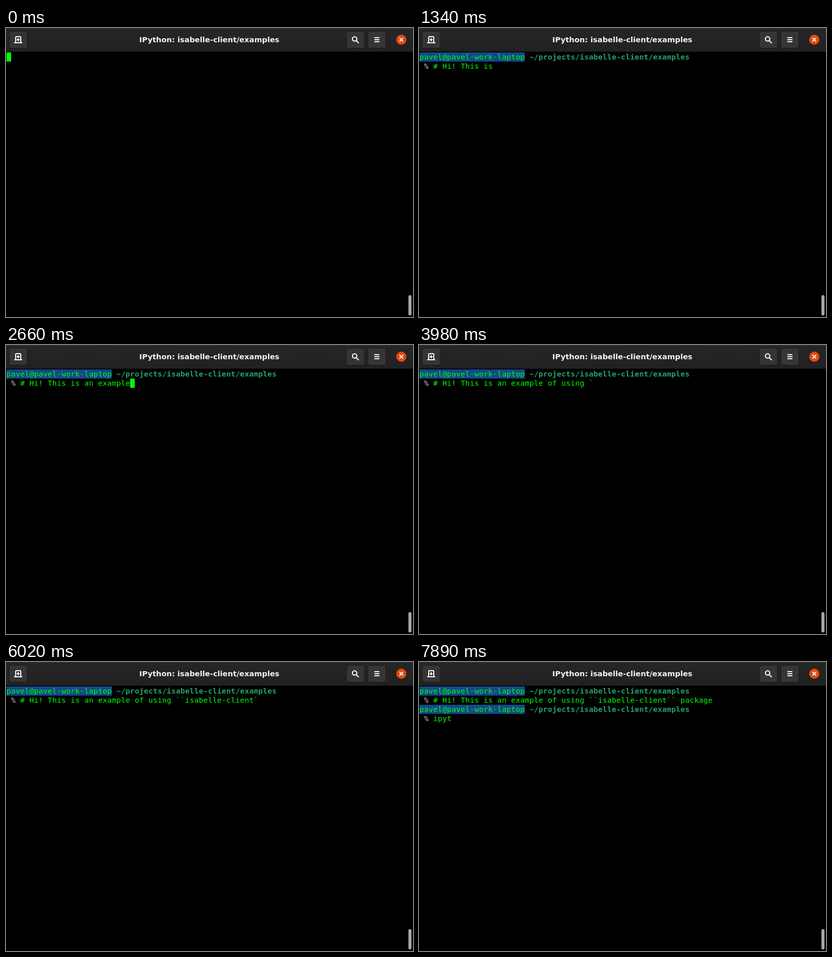
An HTML page with a canvas for the animation above (8 s loop, 800x568 px).

```html
<!DOCTYPE html>
<html lang="en">
<head>
<meta charset="utf-8">
<title>Terminal</title>
<style>
  html, body { margin: 0; width: 100%; height: 100%; overflow: hidden; background: #000; }
  canvas { display: block; width: 800px; height: 568px; }
</style>
</head>
<body>
<canvas id="stage" width="800" height="568"></canvas>
<script>
const ctx = document.getElementById("stage").getContext("2d");
const LOOP = 8000, KEY = 120, ENTER = 7320;
const CELL_W = 9, CELL_H = 18, LEFT = 1, TOP = 48, ASCENT = 14;
const MONO = '14.667px "DejaVu Sans Mono", monospace';
const LIME = "#00ff00";
const USER = "pavel@pavel-work-laptop";
const FOLDER = "~/projects/isabelle-client/examples";
const COMMENT = "# Hi! This is an example of using ``isabelle-client`` package";
const COMMAND = "ipython";

const cellX = col => LEFT + col * CELL_W;
const cellY = row => TOP + row * CELL_H;

function rect(x, y, w, h, color) {
  ctx.fillStyle = color;
  ctx.fillRect(x, y, w, h);
}

function rounded(x, y, w, h, r, color) {
  ctx.fillStyle = color;
  ctx.beginPath();
  ctx.roundRect(x, y, w, h, r);
  ctx.fill();
}

function stroke(path, width, color = "#fff") {
  ctx.strokeStyle = color;
  ctx.lineWidth = width;
  ctx.stroke(new Path2D(path));
}

// Terminal text sits on a fixed character grid.
function print(text, col, row, color, bold = false) {
  ctx.font = (bold ? "bold " : "") + MONO;
  ctx.textAlign = "left";
  ctx.fillStyle = color;
  [...text].forEach((ch, i) => ctx.fillText(ch, cellX(col + i), cellY(row) + ASCENT));
}

function cursor(col, row) {
  rect(cellX(col), cellY(row), CELL_W, CELL_H, LIME);
}

function prompt(row, typed) {
  rect(LEFT, cellY(row), USER.length * CELL_W, CELL_H, "#12488b");
  print(USER, 0, row, LIME);
  print(FOLDER, USER.length + 1, row, "#26a269", true);
  print("%", 1, row + 1, "#d0cfcc");
  print(typed, 3, row + 1, LIME);
}

function button(x) {
  rounded(x, 6, 36, 34, 4, "#1b1b1b");
  rounded(x + 1, 7, 34, 32, 3, "#353535");
}

function header() {
  const shade = ctx.createLinearGradient(0, 0, 0, 46);
  shade.addColorStop(0, "#262626");
  shade.addColorStop(1, "#212121");
  rect(0, 0, 800, 46, shade);
  rect(0, 0, 800, 1, "#313131");
  rect(0, 46, 800, 1, "#121212");

  [6, 669, 711].forEach(button);
  stroke("M16 29H20M28 29H32M19 29V18.5Q19 17 20.5 17H27.5Q29 17 29 18.5V29M19 29H29", 2);
  stroke("M21 23H27M24 20V26", 2);
  stroke("M689.5 21.5A4.3 4.3 0 1 1 680.9 21.5A4.3 4.3 0 1 1 689.5 21.5M688.3 24.7L693.3 29.7", 2.1);
  [18, 22, 26].forEach(y => rect(724, y, 10, 2, "#fff"));

  rounded(767, 13, 20, 20, 10, "#e2490f");
  stroke("M773.5 19.5L780.5 26.5M780.5 19.5L773.5 26.5", 2);

  ctx.font = 'bold 14.667px "DejaVu Sans", sans-serif';
  ctx.textAlign = "center";
  ctx.fillStyle = "#f4f4f4";
  ctx.fillText("IPython: isabelle-client/examples", 399.7, 28);
}

function draw(t) {
  rect(0, 0, 800, 568, "#000");
  header();
  rounded(791, 525, 6, 40, 3, "#a6a6a6");

  const step = Math.floor((t - 20) / KEY) + 1;
  const lit = Math.floor(step / 9) % 2 === 0;
  if (step < 1) return cursor(0, 0);

  // The first two characters arrive together with the prompt.
  const typed = COMMENT.slice(0, step + 1);
  prompt(0, typed);
  if (t < ENTER) {
    if (lit) cursor(3 + typed.length, 1);
    return;
  }
  const next = Math.floor((t - ENTER + 4) / 114);
  if (next < 1) cursor(0, 2);
  else prompt(2, COMMAND.slice(0, next - 1));
}

function tick() {
  draw(performance.now() % LOOP);
  requestAnimationFrame(tick);
}
tick();
</script>
</body>
</html>
```
